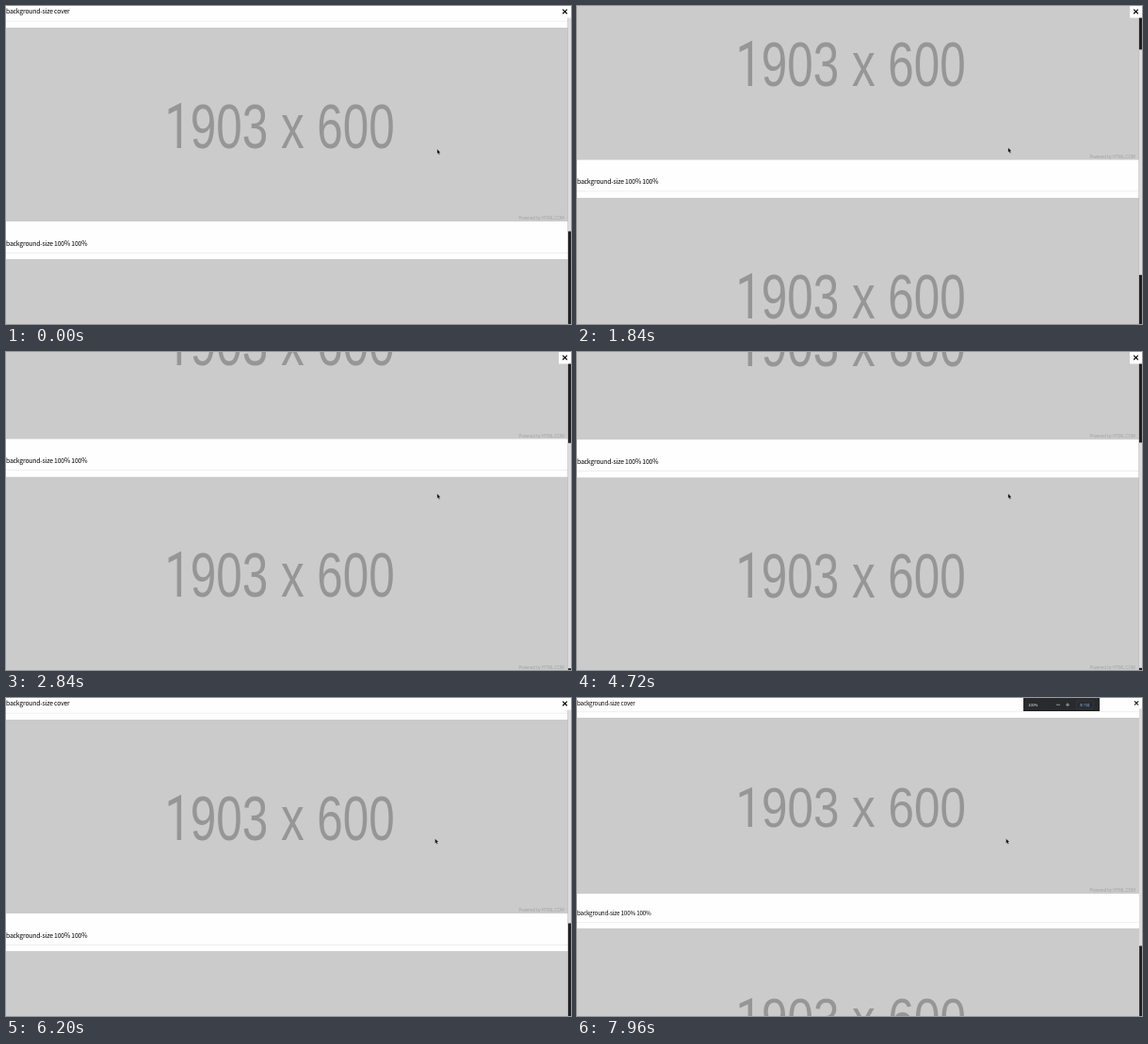
Recreate the animation shown at these times as an HTML page. Size 600 by 338 pixels, loop 8 s.

```html
<!DOCTYPE html>
<html lang="en">
<head>
<meta charset="utf-8">
<title>background-size demo</title>
<style>
  html, body { margin: 0; width: 100%; height: 100%; overflow: hidden; background: #fff; }
  svg { display: block; width: 100%; height: 100%; }
  .label { font: 500 6.25px "Noto Sans CJK KR", "Noto Sans CJK", "Noto Sans", sans-serif; letter-spacing: -.03em; }
  .size { font: 192px "Liberation Sans", Arial, sans-serif; fill: #969696; }
  .plain { font-family: Roboto, sans-serif; }
  .credit { font: 14.2px "Liberation Sans", Arial, sans-serif; fill: #a2a2a2; text-anchor: end; }
  .bubble { font: 3.9px "Noto Sans CJK KR", "Noto Sans CJK", "Noto Sans", sans-serif; fill: #fff; }
</style>
</head>
<body>
<svg viewBox="0 0 600 338" preserveAspectRatio="none">
  <defs>
    <symbol id="banner" viewBox="0 0 1903 600" preserveAspectRatio="none">
      <rect width="1903" height="600" fill="#cbcbcb"/>
      <!-- narrow sans lettering, with a "1" that has no foot -->
      <g class="size" transform="translate(537 372) scale(.82 1)">
        <text class="plain">1</text>
        <text x=".556em">903 x 600</text>
      </g>
      <text class="credit" x="1890" y="594">Powered by HTML.COM</text>
    </symbol>
  </defs>

  <rect width="600" height="338" fill="#fefefe"/>
  <g id="page">
    <g>
      <text class="label" y="7.7">background-size cover</text>
      <rect y="14.4" width="600" height=".5" fill="#e2e2e2"/>
      <use class="image" href="#banner" y="20.8" height="187.5"/>
    </g>
    <g transform="translate(0 223.8)">
      <text class="label" y="7.7">background-size 100% 100%</text>
      <rect y="14.4" width="600" height=".5" fill="#e2e2e2"/>
      <use class="image" href="#banner" y="20.8" height="187.5"/>
    </g>
  </g>

  <g id="chrome">
    <rect x="-2.9" width="2.9" height="338" fill="#222"/>
    <rect id="thumb" x="-3" width="3" fill="#dcdcdc"/>
    <rect x="-11.8" width="11.8" height="11.4" fill="#fff"/>
    <path d="M-8 3.3l4.2 4.2m0-4.2l-4.2 4.2" stroke="#000" stroke-width="1.05" fill="none"/>
  </g>

  <g id="bubble" class="bubble">
    <rect x="474" y="-1" width="81" height="15" fill="#292a2e"/>
    <rect x="474" y="13.3" width="81" height=".7" fill="#15161a"/>
    <text x="479.3" y="8.6">100%</text>
    <path d="M509 7.2h4M519 7.2h4m-2-2v4" stroke="#d5d7da" stroke-width=".6"/>
    <rect x="530.5" y="2.9" width="17.8" height="8.2" rx="1" fill="none" stroke="#474b52" stroke-width=".4"/>
    <text x="533.8" y="8.6" fill="#8ab4f8">초기화</text>
  </g>

  <path id="cursor" d="M0 0v4.7l1.1-1 .9 1.9.8-.4-.9-1.8h1.5z" fill="#111" stroke="#fff" stroke-opacity=".35" stroke-width=".2"/>
</svg>

<script>
const LOOP = 8000, STEP = 40, VIEW = 338;
const BOTTOM = 136.5, TICK = 31.25;
const CONTENT = 477;
const $ = id => document.getElementById(id);
const images = document.querySelectorAll('.image');

const progress = (t, start, length) => Math.min(1, Math.max(0, (t - start) / length));

// cubic-bezier(.42, 0, .58, 1), inverted by bisection
function easeInOut(x) {
  let low = 0, high = 1;
  for (let i = 0; i < 20; i++) {
    const u = (low + high) / 2;
    if (1.26 * u - .78 * u * u + .52 * u ** 3 < x) low = u; else high = u;
  }
  return high * high * (3 - 2 * high);
}

// start, duration, scroll distance
const scrolls = [
  [1668, 278, 3 * TICK],
  [2566, 270, BOTTOM - 3 * TICK],
  [4706, 278, -4 * TICK],
  [5450, 190, 4 * TICK - BOTTOM],
];

function draw(t) {
  const scroll = scrolls.reduce((sum, [start, length, distance]) =>
    sum + distance * easeInOut(progress(t, start, length)), 0);
  const zoom = t < 7400 ? 1.1 : 1;
  const ratio = VIEW / (CONTENT * zoom / 1.1);

  $('page').setAttribute('transform', `translate(0 ${-scroll}) scale(${zoom})`);
  images.forEach(image => image.setAttribute('width', 600 / zoom - 2.9));

  $('chrome').setAttribute('transform', `translate(600 0) scale(${zoom})`);
  $('thumb').setAttribute('y', scroll * ratio / zoom);
  $('thumb').setAttribute('height', VIEW * ratio / zoom);

  $('bubble').setAttribute('opacity', progress(t, 7280, 240));

  const lift = progress(t, 160, 80), drift = progress(t, 6040, 160);
  $('cursor').setAttribute('transform',
    `translate(${457.9 - 2.2 * drift} ${152.3 - 1.5 * lift - 1.1 * drift})`);
}

const origin = performance.now();
function tick() {
  const t = (performance.now() - origin) % LOOP;
  draw(Math.floor(t / STEP) * STEP);
  requestAnimationFrame(tick);
}
tick();
</script>
</body>
</html>
```
